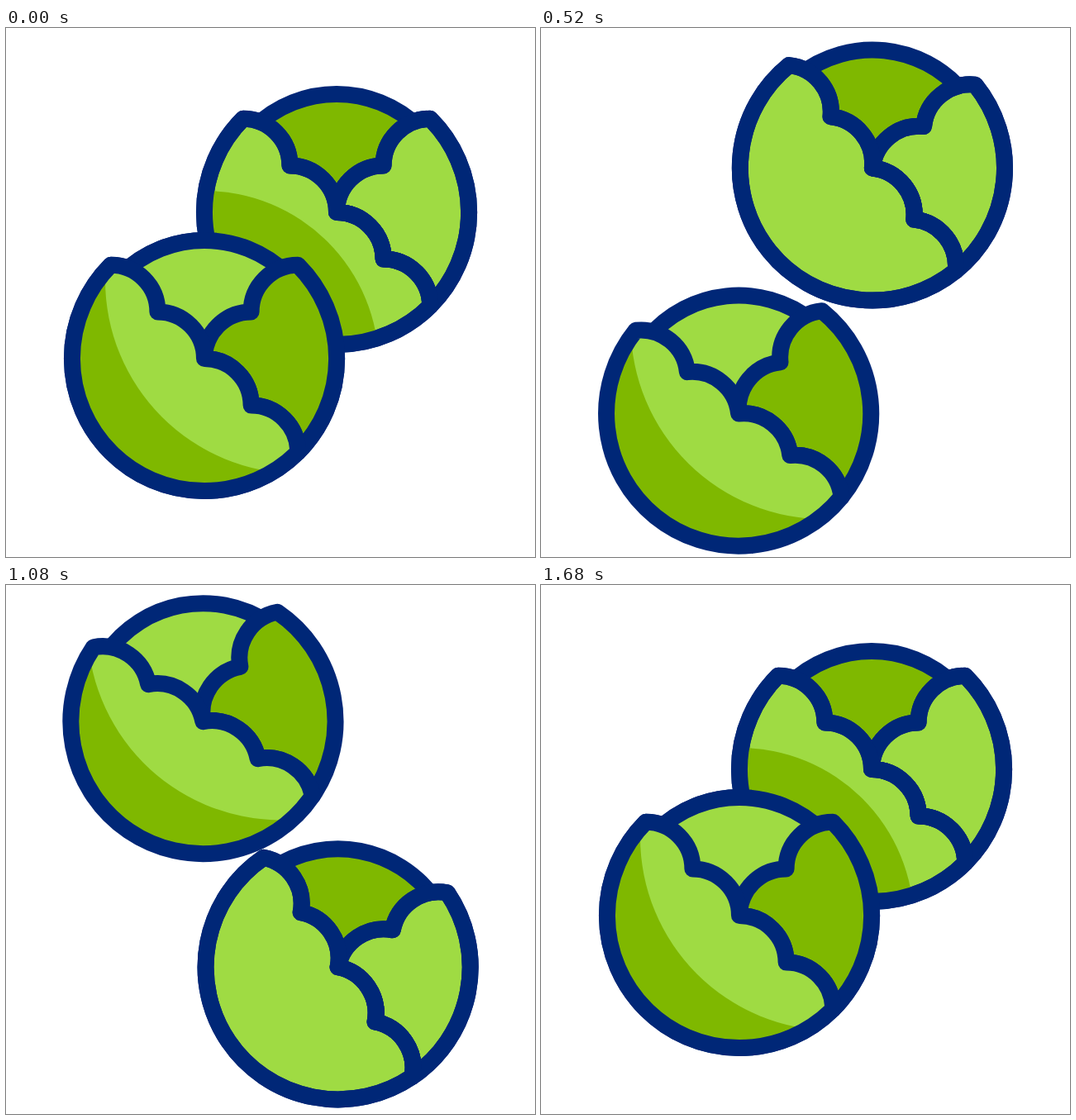
Recreate the animation shown at these times as an HTML page without scripts. Size 640x640 px, loop 2 s.

```html
<!DOCTYPE html>
<html lang="en">
<head>
<meta charset="utf-8">
<title>Juggled cabbages</title>
<style>
  html, body { margin: 0; width: 100%; height: 100%; overflow: hidden; background: #fff; }
  svg { display: block; width: 100vw; height: 100vh; }

  .line { stroke: #002777; stroke-width: 20; stroke-linejoin: round; stroke-linecap: round; }
  .light { fill: #9fdb43; }
  .dark { fill: #7fb800; }
  .none { fill: none; }

  .left, .right { transform-origin: 0 8.5px; }
  .left { animation: left-toss 2s infinite, left-tilt 2s infinite; }
  .right { animation: right-toss 2s infinite, right-tilt 2s infinite; }
  .shade { animation: shade-move 2s infinite, in-front 2s step-end infinite; }
  .front { animation: in-front 2s step-end infinite; }

  @keyframes left-toss {
    0% { translate: 0 0; animation-timing-function: cubic-bezier(.39, 0, .72, 1); }
    25% { translate: 0 68px; animation-timing-function: cubic-bezier(.27, 0, .66, 1); }
    56.5% { translate: 0 -240px; animation-timing-function: cubic-bezier(.34, 0, .62, 1); }
    84%, 100% { translate: 0 0; }
  }
  @keyframes right-toss {
    0% { translate: 0 0; animation-timing-function: cubic-bezier(.39, 0, .72, 1); }
    25% { translate: 0 -55px; animation-timing-function: cubic-bezier(.27, 0, .66, 1); }
    56.5% { translate: 0 244px; animation-timing-function: cubic-bezier(.34, 0, .62, 1); }
    84%, 100% { translate: 0 0; }
  }
  @keyframes left-tilt {
    0% { rotate: 0deg; animation-timing-function: cubic-bezier(.37, 0, .63, 1); }
    50% { rotate: -11.2deg; animation-timing-function: cubic-bezier(.37, 0, .63, 1); }
    84%, 100% { rotate: 0deg; }
  }
  @keyframes right-tilt {
    0% { rotate: 0deg; animation-timing-function: cubic-bezier(.37, 0, .63, 1); }
    50% { rotate: 11.2deg; animation-timing-function: cubic-bezier(.37, 0, .63, 1); }
    84%, 100% { rotate: 0deg; }
  }
  /* Shadow cast by the left cabbage on the right one */
  @keyframes shade-move {
    0% { translate: 0 0; animation-timing-function: cubic-bezier(.39, 0, .72, 1); }
    25% { translate: 3px 84px; animation-timing-function: step-end; }
    56% { translate: -6.6px -233px; animation-timing-function: cubic-bezier(.34, 0, .62, 1); }
    84%, 100% { translate: 0 0; }
  }
  /* The two cabbages swap depth when they are furthest apart */
  @keyframes in-front {
    0% { visibility: visible; }
    25% { visibility: hidden; }
    56%, 100% { visibility: visible; }
  }
</style>
</head>
<body>
<svg viewBox="0 0 640 640">
  <defs>
    <!-- The leaf tips lie on the rim, so the big leaf's outer edge is a half circle -->
    <path id="big-leaf" d="M-113.2-113.2a56.6 56.6 0 0 1 56.6 56.6A56.6 56.6 0 0 1 0 0a56.6 56.6 0 0 1 56.6 56.6A56.6 56.6 0 0 1 113.2 113.2A160 160 0 0 1-113.2-113.2Z"/>
    <path id="small-leaf" d="M113.2-113.2a56.6 56.6 0 0 0-56.6 56.6A56.6 56.6 0 0 0 0 0a56.6 56.6 0 0 1 56.6 56.6A56.6 56.6 0 0 1 113.2 113.2A160 160 0 0 0 113.2-113.2Z"/>
    <clipPath id="in-big-leaf"><use href="#big-leaf"/></clipPath>
    <clipPath id="in-right">
      <path class="right" d="M-113.2-113.2A160 160 0 1 0 113.2-113.2Z"/>
    </clipPath>

    <g id="left-cabbage">
      <circle class="light line" r="143"/>
      <use href="#small-leaf" class="dark line"/>
      <use href="#big-leaf" class="dark"/>
      <circle class="light" cx="114" cy="-95" r="234" clip-path="url(#in-big-leaf)"/>
      <use href="#big-leaf" class="none line"/>
    </g>
  </defs>

  <g transform="translate(240 400)">
    <g class="left"><use href="#left-cabbage"/></g>
  </g>

  <g transform="translate(400 223)">
    <g class="right">
      <circle class="dark line" r="143"/>
      <use href="#small-leaf" class="light line"/>
      <use href="#big-leaf" class="light line"/>
    </g>
    <g clip-path="url(#in-right)">
      <circle class="dark shade" cx="-160" cy="185" r="211"/>
    </g>
    <g class="right none line">
      <use href="#small-leaf"/>
      <use href="#big-leaf"/>
    </g>
  </g>

  <g class="front" transform="translate(240 400)">
    <g class="left"><use href="#left-cabbage"/></g>
  </g>
</svg>
</body>
</html>
```
